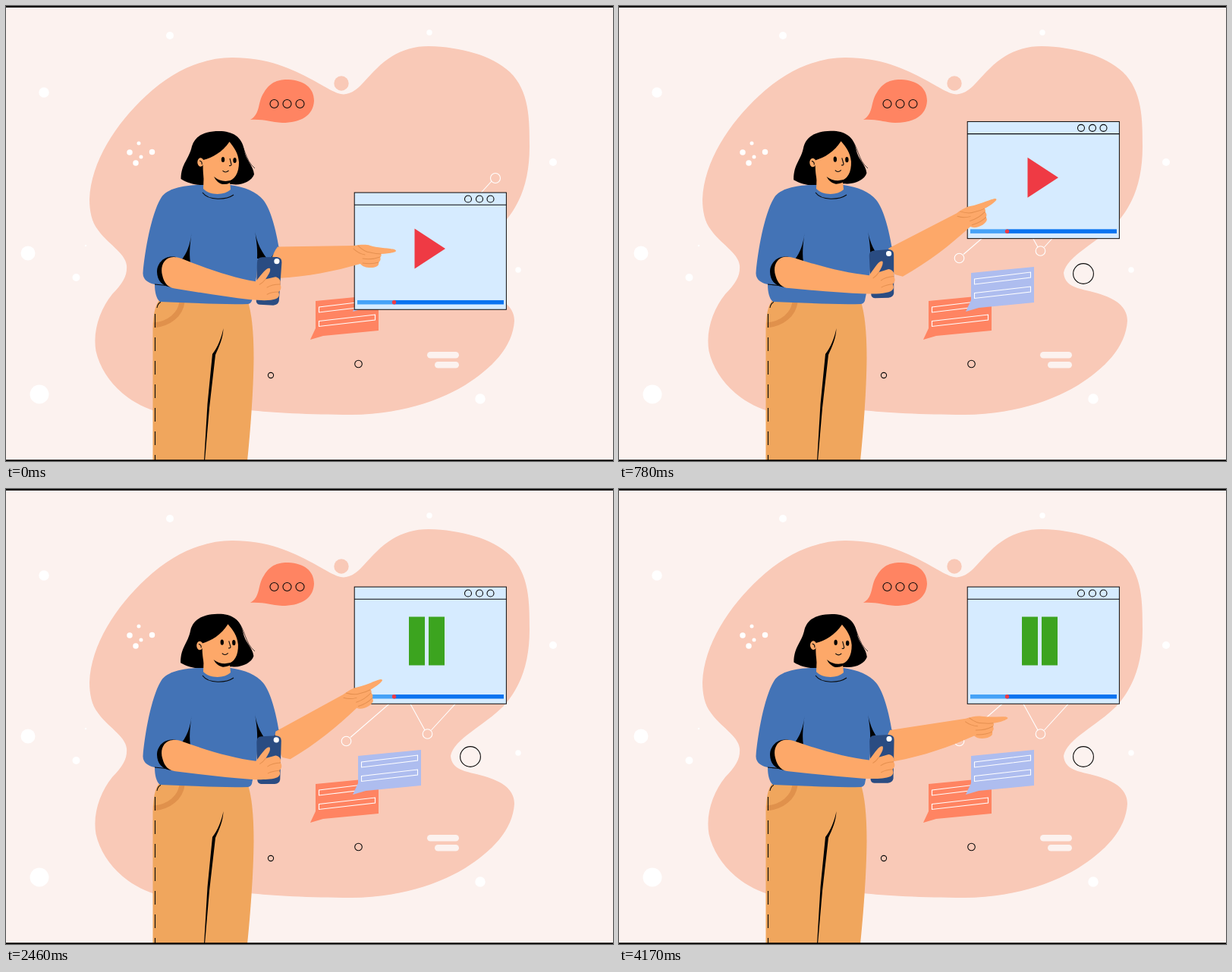
Animation, 800 px wide and 600 px high, one loop 4.2 s. Source, as an HTML page:

```html
<!DOCTYPE html>
<html lang="en">
<head>
<meta charset="utf-8">
<title>Video presenter</title>
<style>
  html, body { margin: 0; width: 100%; height: 100%; overflow: hidden; background: #fcf2ef; }
  svg { display: block; width: 800px; height: 600px; }
  .ink { fill: none; stroke: #0a0a0a; stroke-width: 1.1; stroke-linejoin: round; }
  .chalk { fill: none; stroke: #fff; stroke-width: 1.1; }
  .crease { fill: none; stroke: #e59050; stroke-width: 1; stroke-linecap: round; }
  .dots { fill: none; stroke: #fff; stroke-linecap: round; }
  .hair { stroke-width: .7; }
  .skin { fill: #fda869; }
  .black { fill: #000; }
</style>
</head>
<body>
<svg viewBox="0 0 800 600">
  <rect width="800" height="600" fill="#fcf2ef"/>
  <path fill="#f9c9b7" d="M110 255C112 205 145 155 185 118C220 85 260 68 298 68C345 68 375 82 405 98C425 109 435 116 445 116.500C463 115 471 99 488 83C508 63 530 53 557 53C600 54 640 65 664 87C690 112 690 150 690 185C690 235 675 265 655 287C630 312 590 330 586 352C588 375 615 372 640 382C662 390 670 402 670 415C668 450 640 478 605 500C560 527 505 539 455 539C400 539 350 536 320 533L196 534C158 522 127 492 118.500 455C114 428 124 400 140 380C155 365 160 355 159 342C157 325 133 313 121 295C113 285 110 270 110 255Z"/>
  <circle cx="442" cy="102" r="9.700" fill="#f9c9b7"/>
  <g class="dots">
    <path stroke-width="25" d="M44 512h0"/>
    <path stroke-width="19" d="M29 326h0"/>
    <path stroke-width="13.500" d="M50 114h0M625 518h0"/>
    <path stroke-width="10" d="M216 39h0M721 206h0M92.500 358h0"/>
    <path stroke-width="7.500" d="M558 35h0M675 348h0M163 193h0M192.500 192.500h0M171 207h0"/>
    <path stroke-width="5" d="M175 181h0M178 199h0"/>
    <path stroke-width="2.500" d="M105 316h0"/>
  </g>
  <g fill="#fcf2ef">
    <rect x="555" y="456" width="42" height="8.600" rx="4.300"/>
    <rect x="565" y="469" width="32" height="8.600" rx="4.300"/>
  </g>

  <!-- speech bubbles -->
  <path fill="#ff8462" d="M322 150C336 142 331 127 340 114C349 99 360 97 372 97C393 98 406 108 406 125C405 145 388 154 364 154C348 153 340 149 322 150Z"/>
  <g class="ink">
    <circle cx="353.500" cy="129" r="5.500"/><circle cx="370.500" cy="129" r="5.500"/><circle cx="387.500" cy="129" r="5.500"/>
    <circle cx="349" cy="487" r="3.600"/><circle cx="464.500" cy="472" r="4.800"/>
    <circle cx="612" cy="353" r="13.400"/>
  </g>
  <g fill="#ff8462" transform="translate(-56 37)"><use href="#chat"/></g>
  <g fill="#aebdef"><g id="chat">
    <path d="M464 352L547 344V391L474 398L457 403L464 388Z"/>
    <path class="chalk" d="M468.500 360L542.500 351V358L468.500 367ZM468.500 378.500L542.500 370V377L468.500 385.500Z"/>
  </g></g>

  <!-- line chart behind the player -->
  <path class="chalk" d="M454 327.500L524 267L552 318M560.500 318L640 231"/>
  <g class="chalk"><circle cx="448.500" cy="332.500" r="6.300"/><circle cx="555.500" cy="323" r="6.300"/><circle cx="645" cy="227" r="6.500"/></g>

  <g id="player">
    <rect x="459.200" y=".1" width="200.200" height="154.200" fill="#d6ebff" stroke="#0a0a0a"/>
    <path class="ink" d="M459 16.300H659.500"/>
    <g class="ink"><circle cx="609" cy="8.500" r="4.500"/><circle cx="624" cy="8.500" r="4.500"/><circle cx="638.500" cy="8.500" r="4.500"/></g>
    <path id="play" fill="#ef3a44" d="M538.500 47.500L579 74L538.500 100.500Z"/>
    <path id="pause" fill="#3ca41f" d="M531 39.500H552V103.500H531ZM557 39.500H578V103.500H557Z"/>
    <rect x="463" y="142" width="48" height="5.500" fill="#46a2f7"/>
    <rect x="511" y="142" width="145" height="5.500" fill="#0a73f0"/>
    <circle cx="511.500" cy="144.800" r="2.700" fill="#ef3a44"/>
  </g>

  <!-- trousers -->
  <path fill="#f0a65d" d="M193.500 600V425C194 405 197 393 203 387H318C324 405 326.500 430 326.500 465C326 510 322 560 318 600Z"/>
  <path fill="none" stroke="#e0914c" stroke-width="7" d="M195 421C215 419 230 407 232 390"/>
  <path class="black" d="M286.500 425C286 438 281 449 276 460L268 530L262 600H261L265.500 525L272 459C279 450 284 438 286.500 425Z"/>
  <path class="ink" d="M199 398Q200 392 204 390.500"/>
  <path class="ink" stroke-dasharray="18 13" d="M196.500 406V600"/>

  <!-- head -->
  <path class="ink hair" d="M303 172C316 184 314 203 328 214"/>
  <g id="head">
    <path class="black" d="M281 165C260 165 249 172 245 185C241 203 231 207 230.500 228C240 234 252 237 264 236L298 235C310 237 324 231 327 222C326 210 316 204 314 190C311 172 298 165 281 165Z"/>
  </g>

  <!-- sweater -->
  <path fill="#4373b6" d="M259 236C232 236 213 241 205 252C192 272 183 322 180.500 352C180 362 190 366 196 367C196 377 198 386 203 390C240 391 280 394 319 393Q324 392 324.500 386C328 370 331 355 331 345L352 345V330L359.500 318C356 296 349 269 340 257C331 245 315 239 296 236Z"/>
  <path class="skin" d="M261 214L260 241C268 250 288 250 296 242L294 220Z"/>
  <path class="ink" d="M259 246C267 257 290 256 300 249"/>
  <g class="black">
    <path d="M244.500 299C243 315 238 326 232 334L243 338C241 325 243 312 244.500 299Z"/>
    <path d="M327.500 291C329 308 334 320 344 333H331C332 318 329 305 327.500 291Z"/>
    <path d="M359.500 317L350 331L357 333Z"/>
    <path d="M358 322L361 345C364 353 373 354 378 351L370 330Z"/>
  </g>

  <g id="face">
    <path class="skin" d="M294.500 179C285 193 272 200 260 203C259 215 260 225 262 232L290 232C302 230 307 220 307 206C306 194 301 187 294.500 179Z"/>
    <ellipse class="skin" cx="256.500" cy="206" rx="4.200" ry="5.800"/>
    <path class="black" d="M274 225Q286 235 302 228Q295 236 285 235Q278 233 274 225Z"/>
    <ellipse cx="286" cy="202.500" rx="2.200" ry="3.600"/>
    <ellipse cx="301.500" cy="203.500" rx="2.200" ry="3.600"/>
    <path class="ink" d="M295 201L297 209Q297 211 294 210.500M285.500 217Q289 221 293.500 217M255 204Q259 205 258 209"/>
  </g>

  <!-- pointing arm -->
  <g id="arm">
    <path class="skin" d="M358 317.500C354 322 352 328 350 334V352L358 359C398 357 432 350 467 340C470 344 476 345.500 483 345C489 344 492 342 491 338C494 336 494 333 493 331C495 330 495 328 494 327C502 327 510 325.500 513 324Q515.500 322.500 512 321C502 319 490 319 480 316C474 314 466 315 459 316Z"/>
    <path class="crease" d="M458 320Q464 326 473 328M464 316Q472 324 480 325Q488 327 494 327M470 333Q482 335 493 331M470 339Q482 341 491 338"/>
  </g>

  <!-- arm with the phone -->
  <path class="black" d="M224 331C208 328 199 340 199 350C199 362 206 370 219 371Z"/>
  <path class="ink" d="M196 367L216 369"/>
  <g id="forearm">
    <path fill="#2a4c82" d="M331 339Q331 332 338 332H357Q364 333 363.500 339L359.500 390Q358.500 395 352 395.500L334 394.500Q329 394 329.500 388Z"/>
    <circle cx="357" cy="337.500" r="3.600" fill="#fff"/>
    <path class="skin" d="M221 331C208 331 203 344 206 355C208 365 213 371 222 372.500C255 378 290 384 322 388C335 389 348 390 356 387C361 384 360 381 359 378C363 375 363 371 361 368C363 363 360 359 355 358L342 361C346 355 349 351 348 347C344 345 339 352 329 364C300 359 268 348 234 334C229 332 225 331 221 331Z"/>
    <path class="crease" d="M342 361Q338 366 334 368M361 368Q350 368 344 372M359 378Q350 378 344 381"/>
  </g>

  <rect width="800" height="2"/>
  <rect y="598.300" width="800" height="2"/>
</svg>
<script>
const LOOP = 4200, STEP = 30;
const RAISED = 1254;                 // ms at which player and arm reach the top
const RISE = .0967, SINK = .034;     // degrees of swing per ms
const $ = id => document.getElementById(id);
const cos = deg => Math.cos(deg * Math.PI / 180);
const turn = (id, angle, x, y) => $(id).setAttribute('transform', `rotate(${angle} ${x} ${y})`);

function draw(t) {
  const left = Math.max(0, RAISED - t), past = Math.max(0, t - RAISED);
  const top = 129 + 77 * (1 - cos(RISE * left));
  const arm = -11.3 - 21.8 * cos(RISE * left + SINK * past);
  const forearm = -3.3 + 3.5 * cos(33 + t / 10);

  $('player').setAttribute('transform', `translate(0 ${top})`);
  $('play').style.display = past ? 'none' : '';
  $('pause').style.display = past ? '' : 'none';
  turn('arm', arm, 361, 324);
  turn('forearm', forearm, 218, 350);
  for (const id of ['head', 'face']) turn(id, arm / 15, 272, 240);
}

let start;
function tick(now) {
  start ??= now;
  draw(Math.floor((now - start) % LOOP / STEP) * STEP);
  requestAnimationFrame(tick);
}
draw(0);
requestAnimationFrame(tick);
</script>
</body>
</html>
```
